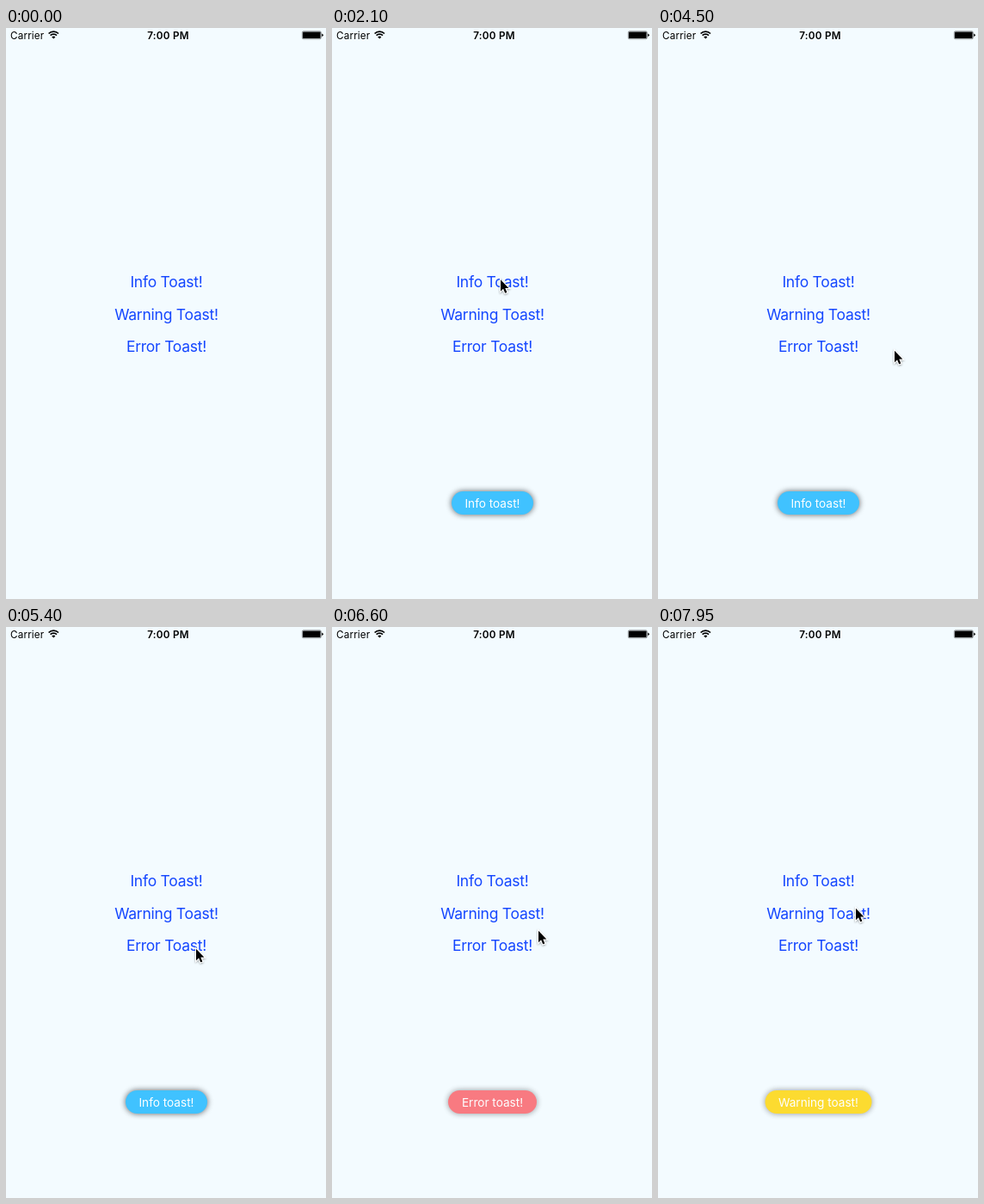
An HTML page that plays this animation: 372 px wide and 663 px high, repeating every 8000 ms.

```html
<!DOCTYPE html>
<html lang="en">
<head>
<meta charset="utf-8">
<title>Toast demo</title>
<style>
  html, body { margin: 0; width: 100%; height: 100%; overflow: hidden; background: #f3fbff; }
  svg { display: block; width: 100%; height: 100%; }
  text { font-family: Inter, Roboto, sans-serif; }
  .status { font-size: 11.7px; letter-spacing: .15px; }
  .clock { font-weight: 600; letter-spacing: .25px; }
  .button { font-size: 17.5px; letter-spacing: -.24px; fill: #1446ff; text-anchor: middle; }
  .toast { font-size: 13.6px; fill: #fff; text-anchor: middle; }
</style>
</head>
<body>
<svg viewBox="0 0 372 663">
  <defs>
    <filter id="glow" x="-30%" y="-80%" width="160%" height="260%">
      <feGaussianBlur stdDeviation="3.8"/>
    </filter>
    <filter id="soft" x="-50%" y="-50%" width="200%" height="200%">
      <feDropShadow dx="0" dy="1" stdDeviation="1" flood-opacity=".4"/>
    </filter>
  </defs>
  <rect width="372" height="663" fill="#f3fbff"/>

  <text class="status" x="5" y="12.6">Carrier</text>
  <g fill="none" stroke="#000" stroke-width="1.7">
    <path d="M49.6 6.5a8 8 0 0 1 11.4 0M51.6 8.7a5.2 5.2 0 0 1 7.4 0"/>
    <path d="M55.3 12.6l-2.1-2.1a3 3 0 0 1 4.2 0z" fill="#000" stroke="none"/>
  </g>
  <text class="status clock" x="188.5" y="12.6" text-anchor="middle">7:00 PM</text>
  <rect x="344.3" y="3.8" width="22" height="9" rx="1.6" fill="none" stroke="#000" stroke-width=".7" opacity=".6"/>
  <rect x="345" y="4.5" width="20.6" height="7.6" rx=".8"/>
  <path d="M367.2 6.6q1.6.4 1.6 1.7t-1.6 1.7z"/>

  <g id="buttons"></g>
  <g id="toasts"></g>
  <g id="cursor">
    <path filter="url(#soft)" d="M1 .8V14.2L4.1 11.3L6.2 16.3L8.4 15.4L6.3 10.5H10.4Z"
      stroke="#fff" stroke-width="2" paint-order="stroke"/>
  </g>
</svg>
<script>
const LOOP = 8000, STEP = 150;
const PRESS = 150, RELEASE = 350, FADE_IN = 500, FADE_OUT = 350;
const $ = id => document.getElementById(id);

// tap: the finger lifts and the toast appears; hide: the toast starts to fade
const items = [
  { name: "Info", tap: 1380, hide: 5420, width: 95, color: "#40c2ff" },
  { name: "Warning", tap: 7590, hide: LOOP, width: 124, color: "#ffd400" },
  { name: "Error", tap: 6240, hide: 7510, width: 103, color: "#fa5c64" }
];

// pointer moves, each from where the last one ended; sag bends the way down
const start = { x: 250, y: 312, at: 900 };
const moves = [
  { from: 900, to: 1200, x: 191, y: 290 },
  { from: 1800, to: 2100, x: 195, y: 291.5 },
  { from: 2700, to: 3150, x: 344, y: 324 },
  { from: 3540, to: 3900, x: 327, y: 329 },
  { from: 4050, to: 4950, x: 221, y: 375, sag: 22 },
  { from: 5100, to: 5250, x: 220, y: 373 },
  { from: 6150, to: 6600, x: 239, y: 352 },
  { from: 6600, to: 7050, x: 229, y: 326 }
];

const clamp = v => Math.min(1, Math.max(0, v));
const ease = v => { v = clamp(v); return v * v * (3 - 2 * v); };

function add(parent, tag, attrs, text = "") {
  const node = document.createElementNS("http://www.w3.org/2000/svg", tag);
  for (const key in attrs) node.setAttribute(key, attrs[key]);
  node.textContent = text;
  return parent.appendChild(node);
}

items.forEach((item, i) => {
  const { name, width, color } = item;
  const pill = { x: 186.5 - width / 2, y: 538, width, height: 27, rx: 13.5 };
  item.button = add($("buttons"), "text", { class: "button", x: 186.5, y: 301 + 37.5 * i }, `${name} Toast!`);
  item.toast = add($("toasts"), "g", {});
  item.shadow = add(item.toast, "rect", { ...pill, filter: "url(#glow)" });
  add(item.toast, "rect", { ...pill, fill: color });
  add(item.toast, "text", { class: "toast", x: 186.5, y: 556.5 }, `${name} toast!`);
});

function pointerAt(time) {
  let { x, y } = start;
  for (const m of moves) {
    const k = ease((time - m.from) / (m.to - m.from));
    x += (m.x - x) * k;
    y += (m.y - y) * k + (m.sag || 0) * Math.sin(Math.PI * k);
  }
  return [x, y];
}

function draw(time) {
  for (const { tap, hide, button, toast, shadow } of items) {
    const lit = time < tap - PRESS ? 1 : .2 + .8 * ease((time - tap) / RELEASE);
    const alpha = ease((time - tap) / FADE_IN) * (1 - ease((time - hide) / FADE_OUT));
    button.setAttribute("opacity", lit);
    toast.setAttribute("opacity", alpha);
    shadow.setAttribute("opacity", .62 * alpha);
  }
  $("cursor").setAttribute("visibility", time < start.at ? "hidden" : "visible");
  $("cursor").setAttribute("transform", `translate(${pointerAt(time)})`);
}

function tick() {
  const time = performance.now() % LOOP;
  draw(Math.floor(time / STEP) * STEP);
  requestAnimationFrame(tick);
}
tick();
</script>
</body>
</html>
```
